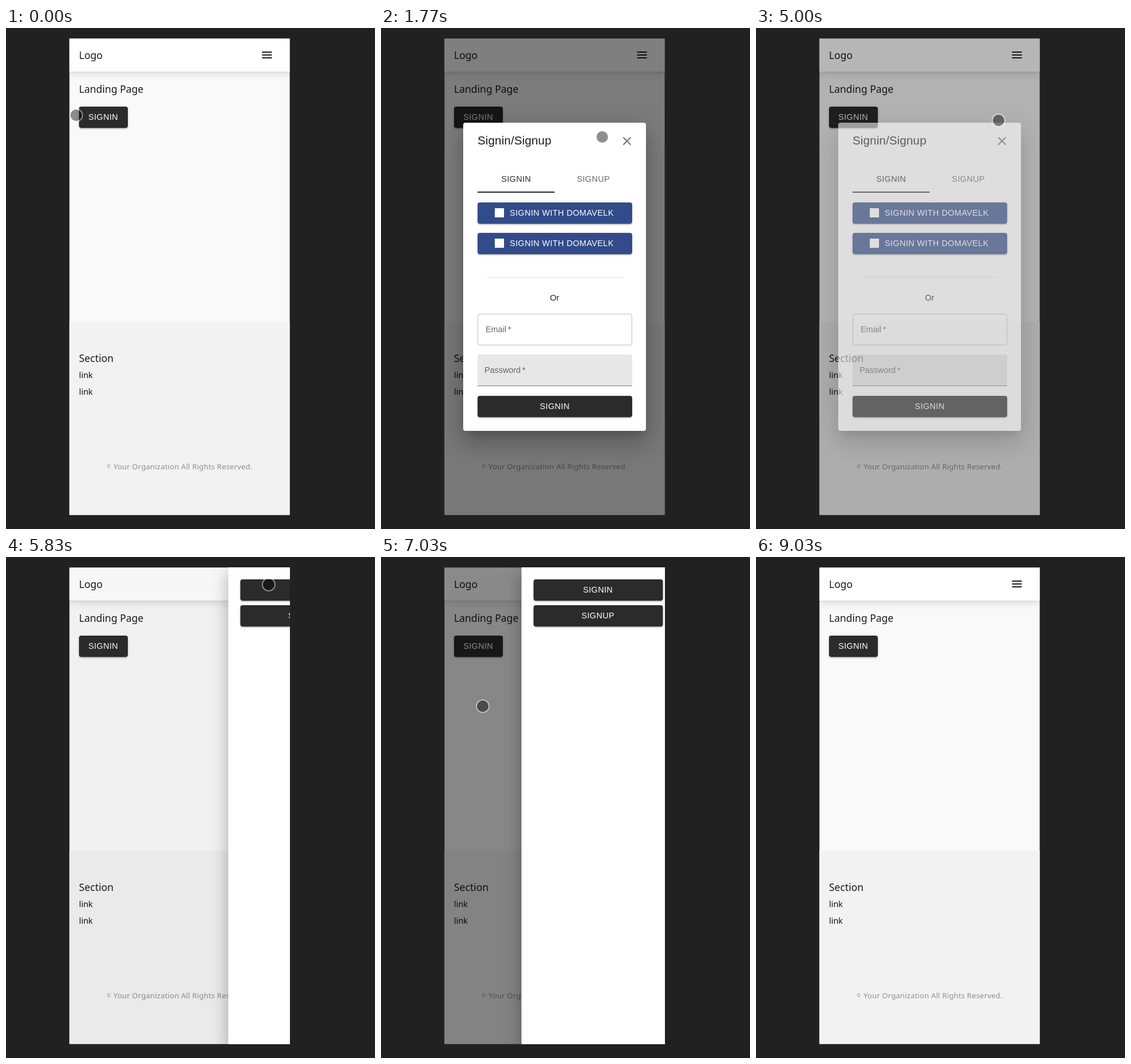
An HTML page for the animation above (9830 ms loop, 642 by 873 pixels).

```html
<!DOCTYPE html>
<html lang="en">
<head>
<meta charset="utf-8">
<title>Sign-in flow</title>
<style>
  html, body { margin: 0; width: 100%; height: 100%; overflow: hidden; background: #212121; }
  body { position: relative; font: 14.35px "Liberation Sans", Arial, sans-serif; color: #1c1c1c; }
  div, i { position: absolute; box-sizing: border-box; }
  svg { position: absolute; overflow: visible; fill: none; stroke-width: 2; }

  .phone { left: 0; top: 0; width: 642px; height: 873px; background: #f9f9f9;
    clip-path: inset(18.4px 148.4px 24.4px 110.4px); }
  .footer { left: 110px; top: 512px; width: 384px; height: 337px; background: #f2f2f2; }
  .header { left: 110px; top: 18px; width: 384px; height: 57.6px; background: #fff;
    box-shadow: 0 1px 3px rgba(0,0,0,.08), 0 4px 14px rgba(0,0,0,.12); }

  /* One-line text, centred on its top coordinate */
  .text { height: 30px; margin-top: -15px; line-height: 30px; white-space: pre; }
  .page { left: 127px; font-family: "Noto Sans", sans-serif; font-size: 17.5px; font-weight: 300; }
  .link { font-size: 14.4px; color: #111; }
  .copy { font-size: 13px; letter-spacing: .2px; color: #8f8f8f; }
  .mid { text-align: center; }
  .caps { letter-spacing: .41px; }

  .btn { height: 36.8px; line-height: 36.8px; border-radius: 4px; background: #2b2b2b; color: #fff;
    text-align: center; letter-spacing: .41px; white-space: pre;
    box-shadow: 0 3px 1px -2px rgba(0,0,0,.2), 0 2px 2px rgba(0,0,0,.14), 0 1px 5px rgba(0,0,0,.12); }
  .wide { left: 25px; width: 268.5px; }
  .social { background: #324b8a; text-align: left; padding-left: 56px; }
  .social i { left: 30px; top: 10.5px; width: 16px; height: 16px; background: #fff; }

  .backdrop { left: 0; top: 0; width: 100%; height: 100%; background: rgba(0,0,0,.5); opacity: 0; }
  .dialog { left: 143px; top: 164.8px; width: 318px; height: 537.2px; border-radius: 4px; background: #fff; opacity: 0;
    box-shadow: 0 11px 15px -7px rgba(0,0,0,.2), 0 24px 38px 3px rgba(0,0,0,.14), 0 9px 46px 8px rgba(0,0,0,.12); }
  .title { left: 25px; top: 31.5px; font-size: 20.5px; letter-spacing: .15px; }
  .tab { top: 97.8px; width: 134.3px; color: #2b2b2b; }
  .bar { left: 25px; top: 120px; width: 134.3px; height: 2px; background: #2b2b2b; }
  .rule { left: 41px; top: 269.5px; width: 236px; height: 1px; background: rgba(0,0,0,.13); }
  .field { height: 54.6px; line-height: 53px; padding-left: 13px; border: 1px solid rgba(0,0,0,.25);
    border-radius: 4px; color: #666; white-space: pre; }
  .filled { border: 0; border-bottom: 1px solid #767676; border-radius: 4px 4px 0 0; padding-left: 12px;
    line-height: 55px; background: #e7e7e7; }
  .rest { left: 0; top: 333.3px; width: 100%; height: 180px; }

  .drawer { left: 228px; top: 18px; width: 266px; height: 831px; background: #fff;
    box-shadow: 0 8px 10px -5px rgba(0,0,0,.2), 0 16px 24px 2px rgba(0,0,0,.14), 0 6px 30px 5px rgba(0,0,0,.12); }
  .drawer .btn { left: 20.5px; width: 225px; }

  .cursor { left: -10px; top: -10px; width: 20px; height: 20px; border-radius: 50%;
    background: rgba(0,0,0,.44); box-shadow: 0 0 0 2px rgba(255,255,255,.45); }
</style>
</head>
<body>
<div class="phone">
  <div class="footer"></div>
  <div class="header"></div>
  <div class="text page" style="top:46.5px">Logo</div>
  <svg style="left:445px;top:40px" width="18" height="14" stroke="#1f1f1f"><path d="M.5 2H17.5M.5 7H17.5M.5 12H17.5"/></svg>
  <div class="text page" style="top:106px">Landing Page</div>
  <div class="btn" style="left:126.8px;top:137px;width:84.8px">SIGNIN</div>
  <div class="text page" style="top:575px">Section</div>
  <div class="text page link" style="top:604.5px">link</div>
  <div class="text page link" style="top:633.5px">link</div>
  <div class="text page copy" style="left:175.5px;top:764px;font-size:8px">©</div>
  <div class="text page copy" style="left:187px;top:764px">Your Organization All Rights Reserved.</div>

  <div class="backdrop" id="dialogShade"></div>
  <div class="dialog" id="dialog">
    <div class="text title">Signin/Signup</div>
    <svg style="left:278.3px;top:25.6px" width="14" height="14" stroke="#707070"><path d="M.5 .5L13.5 13.5M13.5 .5L.5 13.5"/></svg>
    <div class="text tab mid caps" id="tabIn" style="left:25px">SIGNIN</div>
    <div class="text tab mid caps" id="tabUp" style="left:159.3px">SIGNUP</div>
    <div class="bar" id="bar"></div>
    <div class="btn wide social" style="top:139px"><i></i>SIGNIN WITH DOMAVELK</div>
    <div class="btn wide social" style="top:192.2px"><i></i>SIGNIN WITH DOMAVELK</div>
    <div class="rule"></div>
    <div class="text mid" style="left:0;top:305.5px;width:100%">Or</div>
    <div class="field wide" id="name" style="top:333.3px">Name&thinsp;*</div>
    <div class="rest" id="rest">
      <div class="field wide" style="top:0">Email&thinsp;*</div>
      <div class="field filled wide" style="top:71.4px">Password&thinsp;*</div>
      <div class="btn wide" id="sendIn" style="top:142.7px">SIGNIN</div>
      <div class="btn wide" id="sendUp" style="top:142.7px">SIGNUP</div>
    </div>
  </div>

  <div class="backdrop" id="drawerShade"></div>
  <div class="drawer" id="drawer">
    <div class="btn" style="top:21px">SIGNIN</div>
    <div class="btn" style="top:66px">SIGNUP</div>
  </div>
</div>
<div class="cursor" id="cursor"></div>

<script>
  const LOOP = 9830;
  const STANDARD = 'cubic-bezier(.4,0,.2,1)';
  const DECEL = 'cubic-bezier(0,0,.2,1)';
  const SHARP = 'cubic-bezier(.4,0,.6,1)';
  const GLIDE = 'cubic-bezier(.2,.64,.355,1)';
  const SWAY = 'cubic-bezier(.4,.1,.4,1)';
  const HOLD = 'step-end';

  // Each row: time in ms, value, easing towards the next row
  function play(id, prop, rows) {
    const keys = rows.map(([t, value, easing = HOLD]) => ({ offset: t / LOOP, [prop]: value, easing }));
    keys.push({ offset: 1, [prop]: rows[rows.length - 1][1] });
    document.getElementById(id).animate(keys, { duration: LOOP, iterations: Infinity });
  }

  const shiftX = x => `translateX(${x}px)`;
  const shiftY = y => `translateY(${y}px)`;

  // Dialog and its backdrop fade together
  for (const id of ['dialogShade', 'dialog'])
    play(id, 'opacity', [[0, 0], [843, 0, STANDARD], [1068, 1], [4938, 1, STANDARD], [5133, 0]]);

  // Signup tab is active between these two moments
  const UP = 3160, IN = 4020;
  const swap = (id, prop, signin, signup) => play(id, prop, [[0, signin], [UP, signup], [IN, signin]]);
  swap('dialog', 'top', '164.8px', '129.6px');
  swap('dialog', 'height', '537.2px', '607.6px');
  swap('tabIn', 'color', '#2b2b2b', '#6a6a6a');
  swap('tabUp', 'color', '#6a6a6a', '#2b2b2b');
  swap('name', 'opacity', 0, 1);
  swap('rest', 'transform', shiftY(0), shiftY(71));
  swap('sendIn', 'opacity', 1, 0);
  swap('sendUp', 'opacity', 0, 1);
  play('bar', 'transform', [[0, shiftX(0)], [UP, shiftX(0), STANDARD], [UP + 300, shiftX(134.3)],
    [IN, shiftX(134.3), STANDARD], [IN + 300, shiftX(0)]]);

  // Drawer
  play('drawerShade', 'opacity', [[0, 0], [5798, 0, STANDARD], [6023, 1], [6998, 1, STANDARD], [7193, 0]]);
  play('drawer', 'transform', [[0, shiftX(266)], [5798, shiftX(266), DECEL], [6023, shiftX(0)],
    [6998, shiftX(0), SHARP], [7193, shiftX(266)]]);
  play('drawer', 'opacity', [[0, 0], [5798, 1], [7193, 0]]);

  // Pointer moves: start, end, target x, target y, easing
  const moves = [
    [30, 250, 140, 121.5, 'ease-in'], [250, 570, 162, 146, 'ease-out'],
    [1390, 2300, 432, 199, GLIDE], [2410, 2670, 377, 251, SWAY], [2850, 2930, 375.5, 257, SWAY],
    [3400, 3770, 253, 233, SWAY], [4280, 4700, 422, 161, SWAY], [5140, 5470, 457, 48, SWAY],
    [5880, 6030, 470, 103, SWAY], [6210, 6400, 192, 233, SWAY], [6550, 6670, 177, 260, SWAY],
    [7480, 7540, 250, 298, 'ease-in'], [7540, 7605, 526, 209, 'linear']
  ];
  let spot = 'translate(122px,152px)';
  const path = [[0, spot]];
  for (const [from, to, x, y, easing] of moves) {
    path.push([from, spot, easing]);
    spot = `translate(${x}px,${y}px)`;
    path.push([to, spot]);
  }
  play('cursor', 'transform', path);
  play('cursor', 'opacity', [[0, 1], [7628, 0]]);
</script>
</body>
</html>
```
